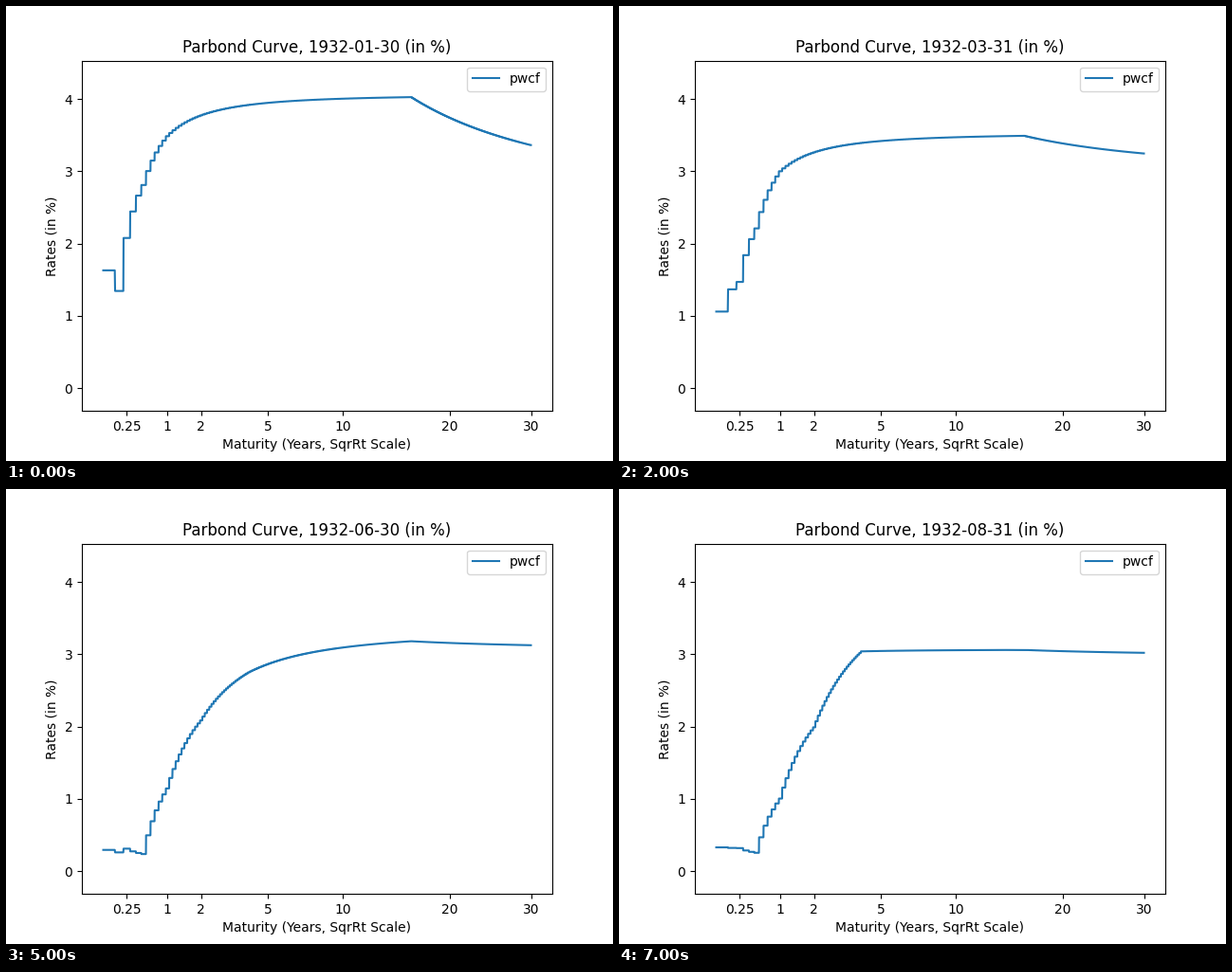
Animation, 640 px wide and 480 px high, one loop 8 s. Source, as a matplotlib script:

```python
import numpy as np
import matplotlib.pyplot as plt
from matplotlib.animation import FuncAnimation

# Daily maturities, each priced at its nearest whole month
YEARS = np.arange(16, 10943) / 365.25
MONTHS = np.round(12 * YEARS)
X = np.sqrt(YEARS)


def par_curve(points):
    """Rates from a few {month: rate} points with constant forwards between,
    which makes the rate linear in 1/maturity."""
    months = np.array(list(points))
    return np.interp(-1 / MONTHS, -1 / months, list(points.values()))


def mix(a, b, w):
    return (1 - w) * a + w * b


jan = par_curve({1: 1.63, 2: 1.345, 6: 2.81, 12: 3.485, 192: 4.025, 360: 3.36})
mar = par_curve({1: 1.06, 3: 1.47, 6: 2.21, 12: 3.0, 192: 3.49, 360: 3.245})
apr = par_curve({1: 0.505, 2: 0.43, 6: 0.72, 12: 1.465, 192: 3.135, 360: 3.085})
may = par_curve({1: 0.28, 3: 0.335, 6: 0.095, 12: 1.34, 24: 1.97, 192: 3.2, 360: 3.165})
jul = par_curve({1: 0.31, 2: 0.2, 6: 0.38, 12: 0.95, 48: 2.825, 192: 3.16, 360: 3.085})
aug = par_curve({1: 0.33, 3: 0.32, 6: 0.255, 12: 1.005, 24: 1.99, 48: 3.04, 192: 3.06, 360: 3.02})

CURVES = [
    ("01-30", jan),
    ("02-29", mix(jan, mar, 0.35)),
    ("03-31", mar),
    ("04-30", apr),
    ("05-31", may),
    ("06-30", mix(may, jul, 0.5)),
    ("07-30", jul),
    ("08-31", aug),
]

fig, ax = plt.subplots(figsize=(6.4, 4.8), dpi=100)
line, = ax.plot(X, jan, color="#1f77b4", lw=1.5, label="pwcf")
title = ax.set_title("")
pad = 0.05 * (X[-1] - X[0])
ax.set_xlim(X[0] - pad, X[-1] + pad)
ax.set_ylim(-0.314, 4.53)
ticks = [0.25, 1, 2, 5, 10, 20, 30]
ax.set_xticks(np.sqrt(ticks), [f"{t:g}" for t in ticks])
ax.set_yticks(range(5))
ax.set_xlabel("Maturity (Years, SqrRt Scale)")
ax.set_ylabel("Rates (in %)")
ax.legend(loc="upper right")


def draw(i):
    day, rates = CURVES[i]
    line.set_ydata(rates)
    title.set_text(f"Parbond Curve, 1932-{day} (in %)")
    return line, title


anim = FuncAnimation(fig, draw, frames=len(CURVES), interval=1000,
                     repeat=True, repeat_delay=0, blit=False)
plt.show()
```
